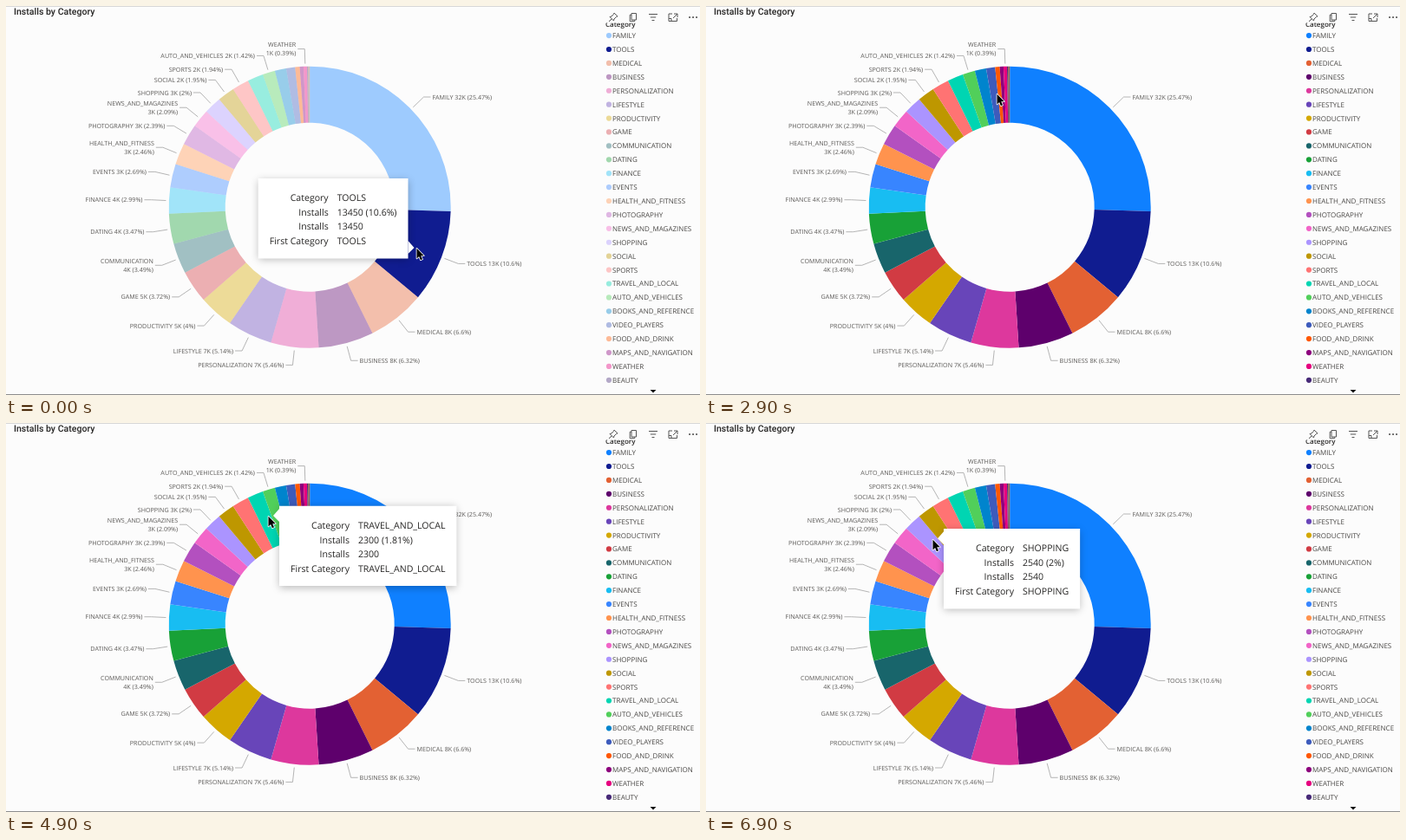
An HTML page with a canvas for the animation above (7000 ms loop, 800 by 449 pixels).

```html
<!DOCTYPE html>
<html lang="en">
<head>
<meta charset="utf-8">
<title>Installs by Category</title>
<style>
html, body { margin: 0; overflow: hidden; }
canvas { display: block; }
</style>
</head>
<body>
<canvas id="stage" width="800" height="449"></canvas>
<script>
const ctx = document.getElementById('stage').getContext('2d');
ctx.textRendering = 'geometricPrecision';
ctx.lineJoin = 'round';
const SANS = '"Open Sans", "Noto Sans", sans-serif';
const CX = 350.2, CY = 232.2, OUTER = 162.5, INNER = 97.5;
const LOOP = 7000, STEP = 100;
const SELECTED = 1, DESELECT_AT = 1200;

// name, share in percent, colour
const slices = `FAMILY 25.47 0f80ff
TOOLS 10.6 101c90
MEDICAL 6.6 e36133
BUSINESS 6.32 5e006c
PERSONALIZATION 5.46 dd389d
LIFESTYLE 5.14 6845b9
PRODUCTIVITY 4 d4a800
GAME 3.72 d13b43
COMMUNICATION 3.49 18656b
DATING 3.47 18a137
FINANCE 2.99 18bdf2
EVENTS 2.69 3885ff
HEALTH_AND_FITNESS 2.46 ff934e
PHOTOGRAPHY 2.39 b350bf
NEWS_AND_MAGAZINES 2.09 f265c8
SHOPPING 2 ab94ff
SOCIAL 1.95 be9700
SPORTS 1.94 ff7373
TRAVEL_AND_LOCAL 1.8124 00d5b2
AUTO_AND_VEHICLES 1.42 51cf5a
BOOKS_AND_REFERENCE 1.304 0084cd
VIDEO_PLAYERS 1.02 3d5bbc
FOOD_AND_DRINK 0.52 ff5700
MAPS_AND_NAVIGATION 0.43 8d007d
WEATHER 0.394 e6007f
BEAUTY 0.12 472a78
OTHER 0.21 8a6650`.split('\n').map(line => {
  const [name, share, color] = line.split(' ');
  const installs = Math.round(share * 1269 / 5) * 5;
  return { name, share: +share, color: '#' + color, installs, percent: `(${+(+share).toFixed(2)}%)` };
});

let sum = 0;
for (const s of slices) {
  s.start = sum / 100 * 2 * Math.PI;
  sum += s.share;
  s.end = Math.min(sum, 100) / 100 * 2 * Math.PI;
}

const twoLine = new Set(['COMMUNICATION', 'HEALTH_AND_FITNESS', 'NEWS_AND_MAGAZINES', 'WEATHER']);
const labelled = slices.filter((s, i) => i < 18 || i === 19 || i === 24);

// time, x, y of the pointer tip
const pointerPath = [
  [0, 473, 279], [1300, 473, 279], [1600, 468, 213], [1700, 468, 213],
  [2000, 456, 196], [2100, 456, 196], [2900, 335, 101], [3200, 331, 101],
  [4000, 320, 101], [4400, 318, 102], [4800, 303, 107], [4900, 302, 107],
  [6000, 270, 128], [6900, 261, 134], [7000, 261, 134]
];

function pointerAt(t) {
  const i = Math.max(1, pointerPath.findIndex(k => k[0] >= t));
  const [t0, x0, y0] = pointerPath[i - 1], [t1, x1, y1] = pointerPath[i];
  const p = Math.max(0, (t - t0) / (t1 - t0));
  return [x0 + (x1 - x0) * p, y0 + (y1 - y0) * p];
}

function text(str, x, y, size, color, align = 'left', font = SANS, weight = 400) {
  ctx.font = `${weight} ${size}px ${font}`;
  ctx.fillStyle = color;
  ctx.textAlign = align;
  ctx.fillText(str, x, y);
}

function line(color, width, ...points) {
  ctx.beginPath();
  points.forEach(([x, y]) => ctx.lineTo(x, y));
  ctx.strokeStyle = color;
  ctx.lineWidth = width;
  ctx.stroke();
}

function drawPath(d, x, y, { fill, stroke, width = 1 }) {
  const path = new Path2D(d);
  ctx.save();
  ctx.translate(x, y);
  ctx.lineWidth = width;
  if (stroke) { ctx.strokeStyle = stroke; ctx.stroke(path); }
  if (fill) { ctx.fillStyle = fill; ctx.fill(path); }
  ctx.restore();
}

function drawDonut(fade) {
  slices.forEach((s, i) => {
    ctx.globalAlpha = fade && i !== SELECTED ? 0.4 : 1;
    ctx.fillStyle = s.color;
    ctx.beginPath();
    ctx.arc(CX, CY, OUTER, s.start - Math.PI / 2, s.end - Math.PI / 2);
    ctx.arc(CX, CY, INNER, s.end - Math.PI / 2, s.start - Math.PI / 2, true);
    ctx.fill();
  });
  ctx.globalAlpha = 1;
}

function drawLabels() {
  for (const s of labelled) {
    const mid = (s.start + s.end) / 2, side = mid < Math.PI ? 1 : -1;
    const at = r => [CX + r * Math.sin(mid), CY + 0.3 - r * Math.cos(mid)];
    const [x, y] = at(183);
    line('#a3a3a3', 0.8, at(166), [x, y], [x + side * 8, y]);
    const value = `${Math.round(s.installs / 1000)}K ${s.percent}`;
    const rows = twoLine.has(s.name) ? [s.name, value] : [`${s.name} ${value}`];
    rows.forEach((row, i) => text(row, x + side * 10, y + 2.6 + (i - (rows.length - 1) / 2) * 9.8,
      7.15, '#5c5a58', side > 0 ? 'left' : 'right'));
  }
}

function drawLegend(fade) {
  ctx.save();
  ctx.beginPath();
  ctx.rect(685, 19.5, 115, 10);
  ctx.clip();
  text('Category', 691, 24.4, 8, '#252423', 'left', SANS, 600);
  ctx.restore();
  slices.slice(0, 26).forEach((s, i) => {
    const y = 34.1 + i * 15.91;
    ctx.globalAlpha = fade && i !== SELECTED ? 0.4 : 1;
    ctx.fillStyle = s.color;
    ctx.beginPath();
    ctx.arc(695, y, 3.1, 0, 2 * Math.PI);
    ctx.fill();
    ctx.globalAlpha = 1;
    text(s.name, 699, y + 3, 8.03, '#4a4846');
  });
  drawPath('M0 0h7l-3.5 3.5z', 742.5, 443, { fill: '#111' });
}

function drawHeader() {
  text('Installs by Category', 9, 10.3, 10.55, '#252423', 'left', 'Roboto, sans-serif', 500);
  const ink = { stroke: '#555', width: 1 };
  drawPath('M1-5L5-1 3.5-.5 1 2 .5 4-4-.5-2-1 .5-3.5zM-1.8 1.8L-5 5', 700, 13, ink);
  drawPath('M-2-4.5h5.5v7.5h-5.5zM-2-2.8h-1.8v7.5h5.5v-1.5', 723, 13, ink);
  drawPath('M-5-3.5h10M-3.2 0h6.4M-1.5 3.5h3', 746, 13, ink);
  drawPath('M-1-4h-4v8.5h9.5v-3.5M1-4h4v4M5-4L0 1M-5 1.5h3v3', 769, 13, ink);
  for (const x of [788, 792, 796]) {
    ctx.fillStyle = '#444';
    ctx.fillRect(x - 0.8, 12.2, 1.7, 1.7);
  }
}

function sliceUnder(x, y) {
  const angle = (Math.atan2(x - CX, CY - y) + 2 * Math.PI) % (2 * Math.PI);
  return slices.find(s => angle < s.end);
}

function drawTooltip(s, x, y) {
  const rows = [['Category', s.name], ['Installs', `${s.installs} ${s.percent}`],
    ['Installs', s.installs], ['First Category', s.name]];
  ctx.font = `400 10.57px ${SANS}`;
  const valueWidth = Math.max(...rows.map(r => ctx.measureText(r[1]).width));
  const width = 104 + valueWidth, height = 92.4;
  const onLeft = x > 310;
  const left = onLeft ? x - 9.5 - width : x + 12;
  const top = y - (y > 250 ? 80 : 11.3);
  const edge = onLeft ? left + width : left, tip = onLeft ? 7 : -7;

  ctx.save();
  ctx.shadowColor = 'rgba(0,0,0,.28)';
  ctx.shadowBlur = 9;
  ctx.shadowOffsetY = 1.5;
  ctx.fillStyle = '#fff';
  ctx.beginPath();
  ctx.rect(left, top, width, height);
  ctx.fill();
  ctx.restore();
  ctx.fillStyle = '#fff';
  ctx.beginPath();
  ctx.moveTo(edge, y - 8);
  ctx.lineTo(edge + tip, y);
  ctx.lineTo(edge, y + 7);
  ctx.fill();

  rows.forEach(([label, value], i) => {
    const base = top + 26.2 + i * 16.6;
    text(label, left + 81, base, 10.57, '#252423', 'right');
    text(value, left + 91, base, 10.57, '#252423');
  });
}

function draw(t) {
  const fade = t < DESELECT_AT;
  ctx.fillStyle = '#fcfcfc';
  ctx.fillRect(0, 0, 800, 449);
  line('#d8d8d8', 1, [0, 0.5], [800, 0.5]);
  line('#8c8c8c', 1, [0, 448.5], [800, 448.5]);
  drawDonut(fade);
  drawLabels();
  drawHeader();
  drawLegend(fade);

  const [x, y] = pointerAt(t);
  if (t < 1400 || t >= 3000) drawTooltip(sliceUnder(x, y), ...pointerAt(Math.max(0, t - STEP)));
  drawPath('M0 0V11.6L2.6 9.2 4.4 13.4 6.5 12.5 4.7 8.4H8.3Z', x + 0.5, y + 0.8,
    { fill: '#000', stroke: '#fff', width: 1.6 });
}

function tick() {
  draw(Math.floor(performance.now() % LOOP / STEP) * STEP);
  requestAnimationFrame(tick);
}
tick();
</script>
</body>
</html>
```
